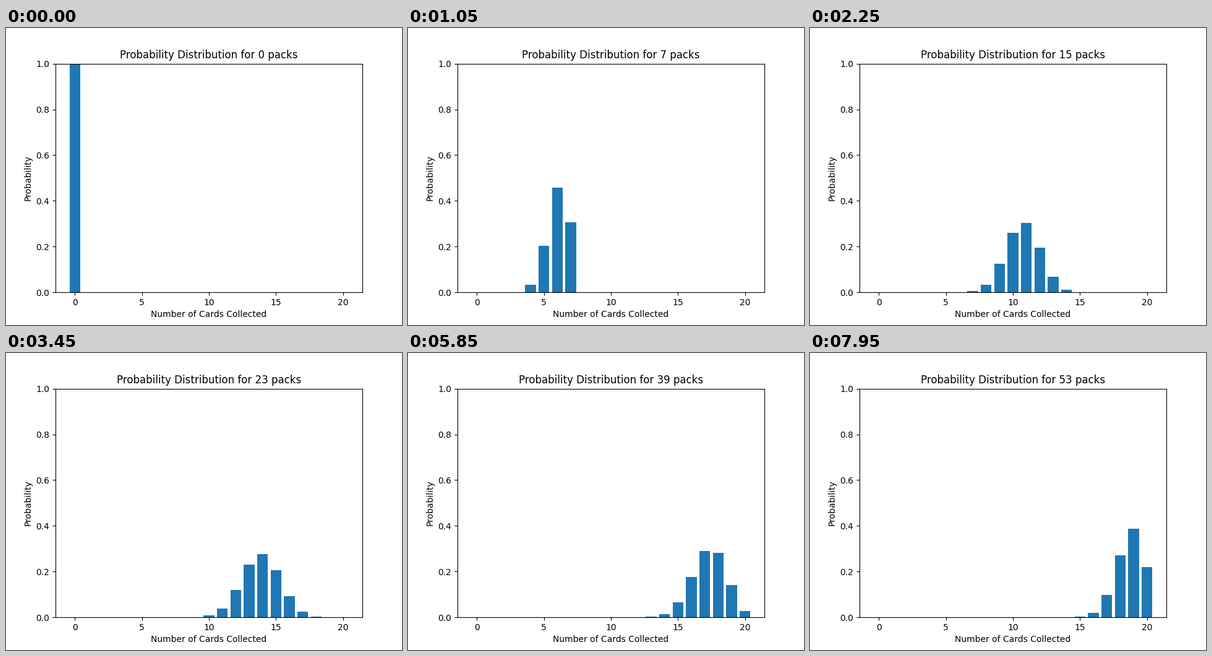
Write a matplotlib script that moves like this. It is 640 by 480 pixels and loops after 8 s.

```python
import numpy as np
import matplotlib.pyplot as plt
from matplotlib.animation import FuncAnimation

CARDS = 20
TICK_MS = 50
TICKS_PER_PACK = 3
LOOP_TICKS = 160


def collection_odds(packs):
    """Chance of owning each number of distinct cards, per number of packs."""
    owned = np.arange(CARDS + 1)
    odds = np.zeros((packs + 1, CARDS + 1))
    odds[0, 0] = 1
    for n in range(packs):
        odds[n + 1] = odds[n] * owned / CARDS
        odds[n + 1, 1:] += odds[n, :-1] * (CARDS - owned[:-1]) / CARDS
    return odds


odds = collection_odds((LOOP_TICKS - 1) // TICKS_PER_PACK)

fig, ax = plt.subplots(figsize=(6.4, 4.8), dpi=100)
bars = ax.bar(range(CARDS + 1), odds[0], color="#1f77b4")
ax.set_xlim(-1.44, CARDS + 1.44)
ax.set_xticks(range(0, CARDS + 1, 5))
ax.set_ylim(0, 1)
ax.set_xlabel("Number of Cards Collected")
ax.set_ylabel("Probability")
title = ax.set_title("")


def update(tick):
    packs = tick // TICKS_PER_PACK
    for bar, height in zip(bars, odds[packs]):
        bar.set_height(height)
    title.set_text(f"Probability Distribution for {packs} packs")
    return [*bars, title]


anim = FuncAnimation(fig, update, frames=LOOP_TICKS, interval=TICK_MS,
                     repeat=True, repeat_delay=0, blit=False)
plt.show()
```
